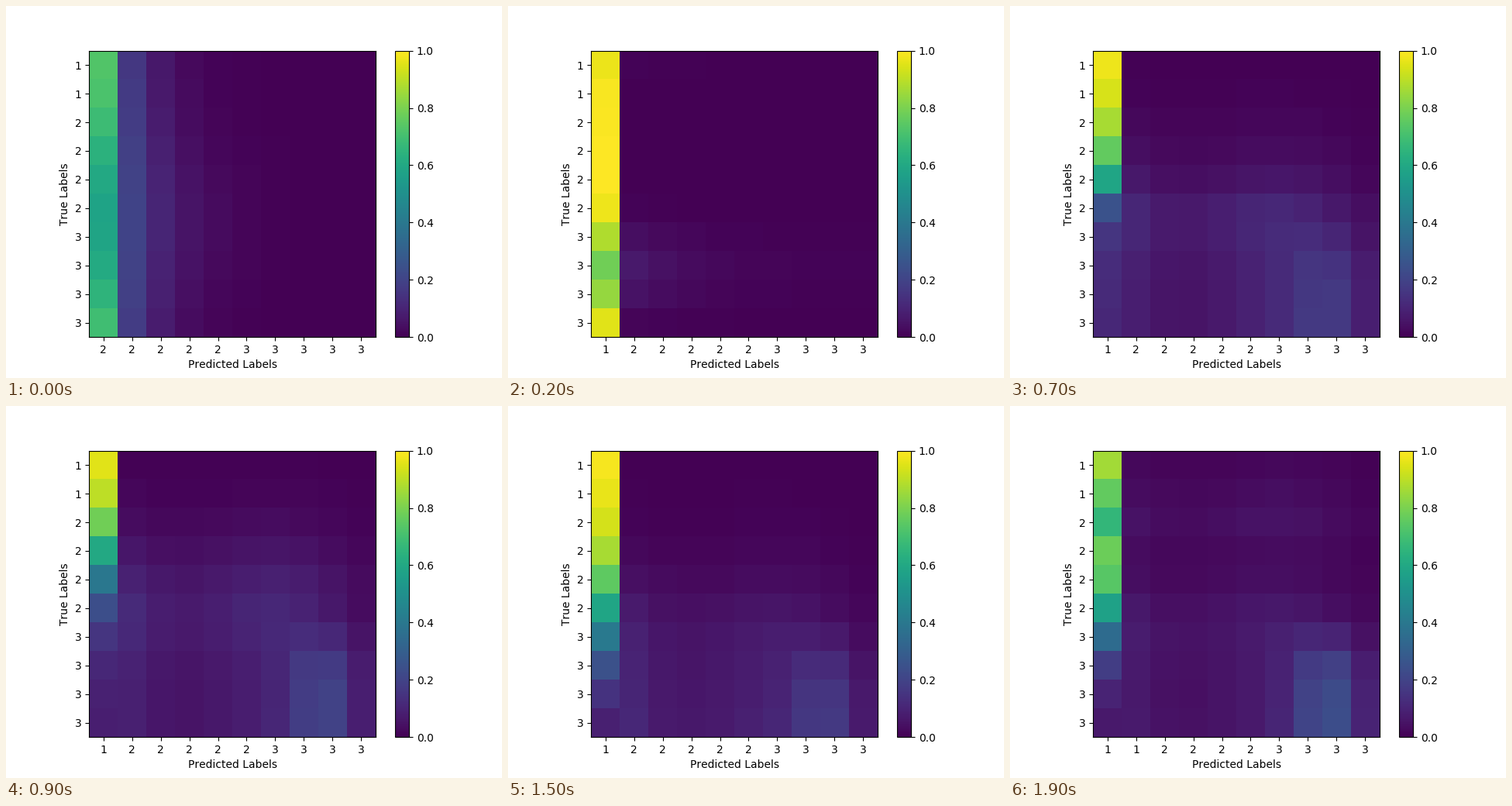
A matplotlib script that plays this animation: 640x480 px, repeating every 2000 ms.

```python
import numpy as np
import matplotlib.pyplot as plt
from matplotlib.animation import FuncAnimation

SIZE = 10
FRAMES = 20
INTERVAL = 100

plt.rcParams["text.kerning_factor"] = 6  # whole-pixel letter spacing

row = np.arange(SIZE)[:, None]
col = np.arange(1, SIZE)[None, :]


def bump(x, width):
    return np.exp(-x**2 / (2 * width**2))


def fall(centre, width, low, high=1):
    """Smooth step from high in the top rows to low in the bottom rows."""
    return low + (high - low) / (1 + np.exp((row - centre) / width))


def spread(corner, left=1.1, width=0.9):
    """Left edge fading out, a broad hump, and a spot in the lower right."""
    ramp = np.clip((row - 5) / 3, 0, 1)
    ramp = ramp**2 * (3 - 2 * ramp)
    return (left * np.exp((1 - col) / 1.8) + bump(col - 6, 2)
            + corner * ramp * bump(col - 7.75, width))


def weights(lead, rest):
    """Join column 0 and the other columns so that each row sums to one."""
    rest = rest / rest.sum(axis=1, keepdims=True)
    return np.hstack([lead, (1 - lead) * rest])


wave = 0.655 + 0.075 * np.cos(np.pi * row / 5.4)
notch = 1 - 0.22 * bump(row - 7.15, 1.04) - 0.03 * np.exp(-row)
dip = 0.2 * bump(row - 1.8, 0.7)

STATES = {
    0: weights(wave, (1 - 0.83 * wave) ** col),
    2: weights(notch, 0.6 ** (col - 1) + 0.12 + 0 * row),
    4: weights(fall(4.48, 0.28, 0.155), spread(0.75, left=0.8, width=2)),
    9: weights(fall(3.3, 1.1, 0.08), spread(2)),
    12: weights(fall(4.25, 0.95, 0.08), spread(3.5, left=1)),
    15: weights(fall(5.4, 1.3, 0.03), spread(1.4, left=1.3)),
    19: weights(fall(5.5, 0.9, 0.05, 0.87) - dip, spread(3, left=1)),
}


def matrix(frame):
    before = max(t for t in STATES if t <= frame)
    after = min(t for t in STATES if t >= frame)
    mix = (frame - before) / max(after - before, 1)
    return (1 - mix) * STATES[before] + mix * STATES[after]


def predicted(frame):
    """Sorted class labels; ones appear as training goes on."""
    ones = (frame >= 1) + (frame >= 18)
    twos = 5 if frame < 18 else 4
    return list(("1" * ones + "2" * twos).ljust(SIZE, "3"))


fig, ax = plt.subplots(figsize=(6.4, 4.8), dpi=100)
image = ax.imshow(matrix(0), cmap="viridis", vmin=0, vmax=1,
                  interpolation="nearest")
fig.colorbar(image, ax=ax)
ax.set_xticks(range(SIZE), predicted(0))
ax.set_yticks(range(SIZE), list("1122223333"))
ax.set_xlabel("Predicted Labels")
ax.set_ylabel("True Labels")


def draw(frame):
    image.set_data(matrix(frame))
    ax.set_xticklabels(predicted(frame))
    return [image]


anim = FuncAnimation(fig, draw, frames=FRAMES, interval=INTERVAL,
                     repeat=True, repeat_delay=0, blit=False)
plt.show()
```
